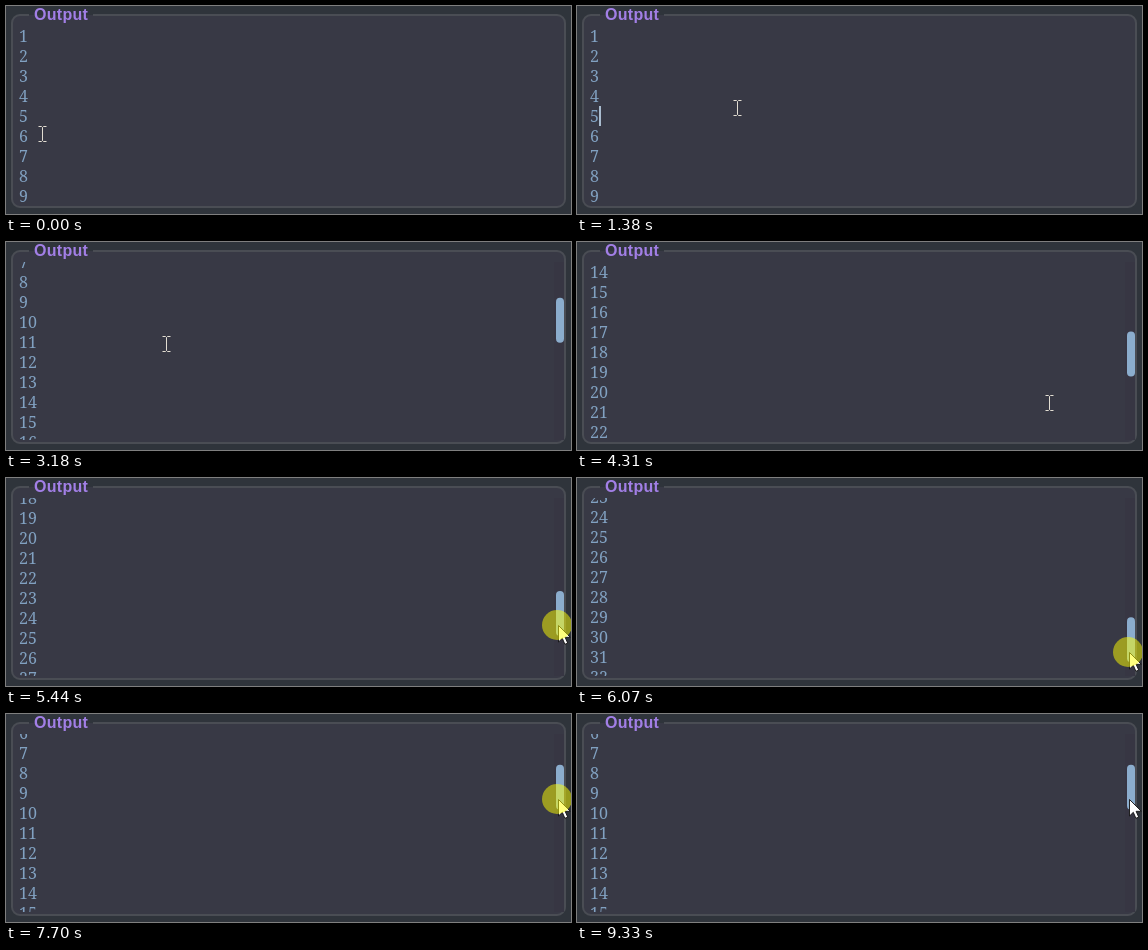
Animation, 565 px wide and 208 px high, one loop 9.96 s. Source, as an HTML page:

```html
<!DOCTYPE html>
<html lang="en">
<head>
<meta charset="utf-8">
<title>Scrolling output panel</title>
<style>
html, body { margin: 0; width: 100%; height: 100%; overflow: hidden; background: #2f343b; }
svg { display: block; }
#lines { font: 16px "Noto Serif", serif; fill: #81a1c1; }
#title { font: bold 16px "Liberation Sans", Arial, sans-serif; letter-spacing: .3px; fill: #a27fe6; }
</style>
</head>
<body>
<svg width="565" height="208" viewBox="0 0 565 208">
  <defs><clipPath id="view"><rect x="8" y="20" width="550" height="178"/></clipPath></defs>
  <rect x="6" y="9" width="553" height="192" rx="8" fill="#383945" stroke="#4a4d54" stroke-width="2"/>
  <path d="M23 8h64v1h-64z" fill="#2f343b"/>
  <path d="M23 9h64v1h-64z" fill="#383945"/>
  <text id="title" x="28" y="14">Output</text>
  <g clip-path="url(#view)"><g id="lines"></g></g>
  <g id="bar">
    <rect x="548" y="20" width="10" height="178" fill="#373643"/>
    <rect id="thumb" x="550" width="8" height="45" rx="4" fill="#8badcd"/>
  </g>
  <rect id="caret" x="22" width="2" height="20" fill="#a9bccf"/>
  <g id="pointer">
    <path id="beam" d="M-3.5-7.5h3l1 1 1-1h3M.5-6.5v13M-3.5 7.5h3l1-1 1 1h3" fill="none" stroke="#e2ddd2"/>
    <path id="arrow" d="M.5 .5v16.5l3.8-3.7 2.6 6 2.8-1.2-2.6-5.8h5.2z" fill="#fff" stroke="#111" stroke-width=".9"/>
    <circle id="press" cx="-1" r="15" fill="#ff0" opacity=".5"/>
  </g>
</svg>
<script>
const LOOP = 9960, ROW = 20, STEP = 125;
const THUMB_TOP = 22, THUMB_RATE = .26;
const pressed = [[1250, 1375], [5190, 6440], [6820, 8070]];

const $ = id => document.getElementById(id);
const show = (id, on) => $(id).setAttribute("visibility", on ? "visible" : "hidden");
const easeOut = u => 1 - (1 - u) ** 1.5;

// Progress 0..1 in n equal jumps, the first at the given time
const steps = (t, from, n) => Math.min(n, Math.max(0, Math.floor((t - from) / STEP) + 1)) / n;

for (let n = 1; n <= 36; n++) {
  const line = document.createElementNS("http://www.w3.org/2000/svg", "text");
  line.setAttribute("x", 13);
  line.setAttribute("y", 16 + n * ROW);
  line.textContent = n;
  $("lines").append(line);
}

function draw(t) {
  const wheel = easeOut(steps(t, 2770, 4)) + easeOut(steps(t, 3430, 3));
  const up = steps(t, 6820, 8) ** 1.37;
  const drag = 198 * easeOut(steps(t, 5190, 9)) - 347 * up;
  const scroll = Math.round(130 * wheel + drag);

  // Pointer: to line 5, across the panel, onto the thumb, then along with it
  const toLine = easeOut(steps(t, 750, 6));
  const across = steps(t, 3560, 4);
  const toThumb = steps(t, 4310, 5);
  const sway = 4 * Math.sin(Math.PI * up);
  const x = Math.round(36 + 124 * toLine + 292 * across + 100 * toThumb + sway);
  const y = Math.round(128 - 26 * toLine + 68 * across - 46 * toThumb + THUMB_RATE * drag - sway);

  // Pressing the button restarts the blink
  const blinkStart = t < 6810 ? 1510 : 6810;
  const arrow = x > 545;

  $("lines").setAttribute("transform", `translate(0 ${-scroll})`);
  $("thumb").setAttribute("y", THUMB_TOP + THUMB_RATE * scroll);
  $("caret").setAttribute("y", 100 - scroll);
  $("pointer").setAttribute("transform", `translate(${x} ${y})`);
  show("bar", scroll > 0);
  show("caret", t >= 1250 && (t - blinkStart) % 1010 < 500);
  show("beam", !arrow);
  show("arrow", arrow);
  show("press", pressed.some(([a, b]) => t >= a && t < b));
}

const start = performance.now();
function tick() {
  draw((performance.now() - start) % LOOP);
  requestAnimationFrame(tick);
}
tick();
</script>
</body>
</html>
```
